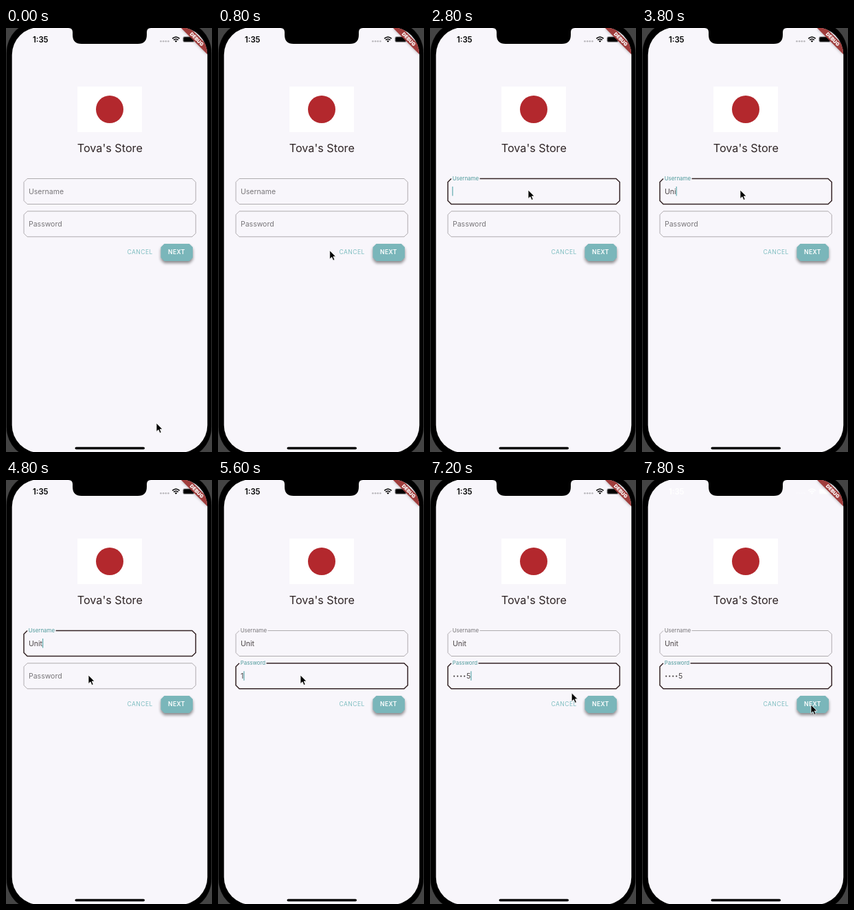
Recreate the animation shown at these times as an HTML page. Size 300 px wide and 615 px high, loop 8000 ms.

```html
<!DOCTYPE html>
<html lang="en">
<meta charset="utf-8">
<title>Login form</title>
<style>
  html, body { margin: 0; width: 100%; height: 100%; overflow: hidden; background: #000 }
  svg { display: block; width: 300px; height: 615px }
  text { font-family: Inter, Roboto, sans-serif; font-size: 10.5px; white-space: pre }
  .value { fill: #4a4445 }
</style>
<svg viewBox="0 0 300 615">
  <defs>
    <clipPath id="screen"><rect x="8.7" y="-1" width="284.6" height="617" rx="40"/></clipPath>
    <filter id="soft" x="-30%" y="-50%" width="160%" height="200%"><feGaussianBlur stdDeviation="2"/></filter>
  </defs>
  <rect width="300" height="615" fill="#444"/>
  <rect x=".3" y="-10" width="299.4" height="635" rx="46" stroke="#555" stroke-width=".6"/>
  <g clip-path="url(#screen)">
    <rect width="300" height="615" fill="#f8f6fb"/>
    <path d="M91 0Q97 0 97 6V10Q97 23 110 23H192Q205 23 205 10V6Q205 0 211 0Z"/>
    <g id="status">
      <text x="39" y="21" style="font-size:11.3px;font-weight:600">1:35</text>
      <g opacity=".25">
        <circle cx="225.5" cy="19.3" r="1.3"/><circle cx="229.2" cy="19.3" r="1.3"/>
        <circle cx="232.8" cy="19.3" r="1.3"/><circle cx="236.4" cy="19.3" r="1.3"/>
      </g>
      <g fill="none" stroke="currentColor" stroke-width="1.6">
        <path d="M242.3 15.3Q247.5 10.7 252.7 15.3M244.2 17.4Q247.5 14.6 250.8 17.4"/>
      </g>
      <path d="M245.7 18.8Q247.5 17.3 249.3 18.8L247.5 20.7Z"/>
      <rect x="257.5" y="12.2" width="17" height="8.6" rx="2.4" opacity=".4"/>
      <rect x="258.5" y="13.2" width="15" height="6.6" rx="1.6"/>
    </g>
    <path d="M255 0H268L293.5 25.5V38.5Z" opacity=".35" filter="url(#soft)"/>
    <path d="M255 0H268L293.5 25.5V38.5Z" fill="#a03d3c"/>
    <text transform="translate(277.8 16.2) rotate(45)" y="2.5" text-anchor="middle" fill="#fff"
      style="font-size:7.1px;font-weight:900">DEBUG</text>

    <rect x="104" y="85" width="94" height="66" fill="#fff"/>
    <circle cx="151" cy="118" r="20" fill="#b3282d"/>
    <text x="151.3" y="180.3" text-anchor="middle" fill="#2f2526" style="font-size:16.2px">Tova's Store</text>

    <g id="fields"></g>
    <g id="dots" class="value"></g>
    <rect id="caret" width="1.2" height="13.5" fill="#5fa9ad"/>

    <text x="176.5" y="328.3" fill="#80bfc2" style="font-size:8.6px;letter-spacing:.4px">CANCEL</text>
    <path d="M230.5 316H267L272 321V336L267 341H230.5L225.5 336V321Z" opacity=".45" filter="url(#soft)"/>
    <path d="M230.5 313H267L272 318V333L267 338H230.5L225.5 333V318Z" fill="#7ab6ba"/>
    <text x="236" y="328.3" fill="#fff" style="font-size:8.6px;letter-spacing:.4px;font-weight:600">NEXT</text>
    <rect x="100.5" y="607.8" width="101.5" height="3.4" rx="1.7"/>
  </g>
  <path id="mouse" d="M0 0V12.5L3 9.8 5 14.5 7.2 13.6 5.2 9H9Z" stroke="#fff" stroke-width=".8"/>
</svg>
<script>
const $ = id => document.getElementById(id);
const LOOP = 8000, STEP = 200;
const USER = 'Unit', USER_KEYS = [3200, 3600, 3800, 4400];
const PIN = '12345', PIN_KEYS = [5600, 5800, 6000, 6200, 6400];

// [start, end, from x, from y, to x, to y]
const MOVES = [
  [0, 1200, 219, 573, 143, 235],
  [4300, 4800, 143, 235, 120, 283],
  [6400, 6650, 120, 283, 142, 281],
  [6650, 7600, 142, 281, 246, 326]
];
// [time, caret opacity]
const BLINKS = [[0, 0], [1600, 1], [2200, .5], [2400, 0], [2800, 1],
  [6600, .5], [6800, 0], [7200, 1], [7600, .4], [7800, 0]];

function makeField(name, y, gapEnd) {
  const g = document.createElementNS('http://www.w3.org/2000/svg', 'g');
  g.innerHTML = `<path fill="none"/><text>${name}</text><text class="value" x="33" y="${y + 22.4}"></text>`;
  $('fields').append(g);
  const [border, label, value] = g.children;
  return {
    y, value,
    draw(floated, focused) {
      const start = floated ? gapEnd : 31, b = y + 37;
      border.setAttribute('d', `M${start} ${y}H271L276.3 ${y + 5}V${b - 5}L271 ${b}H31L26 ${b - 5}V${y + 5}L31 ${y}` +
        (floated ? '' : 'Z'));
      border.setAttribute('stroke', focused ? '#352426' : '#a7a4a8');
      border.setAttribute('stroke-width', focused ? 1.5 : .9);
      label.setAttribute('x', floated ? 32.7 : 33);
      label.setAttribute('y', y + (floated ? 2 : 22.4));
      label.style.fontSize = floated ? '7.9px' : '10.5px';
      label.setAttribute('fill', floated && focused ? '#4f9a9c' : '#777578');
    }
  };
}
const user = makeField('Username', 218.5, 72.5);
const pass = makeField('Password', 265.8, 70.5);

const typed = (keys, t) => keys.filter(k => k <= t).length;
const ease = p => p * p * (3 - 2 * p);

function mouseAt(t) {
  const [a, b, x, y, X, Y] = MOVES.filter(m => m[0] <= t).pop();
  const p = ease(Math.min(1, (t - a) / (b - a)));
  return [x + (X - x) * p, y + (Y - y) * p];
}

function draw(t) {
  const inPass = t >= 5200;
  user.draw(t >= 1800, t >= 1800 && !inPass);
  pass.draw(t >= 5400, t >= 5400);

  user.value.textContent = USER.slice(0, typed(USER_KEYS, t));
  const n = typed(PIN_KEYS, t), hidden = Math.max(0, n - 1);
  pass.value.textContent = n ? PIN[n - 1] : '';
  pass.value.setAttribute('x', 33 + 5 * hidden);
  $('dots').innerHTML = [...Array(hidden).keys()]
    .map(i => `<circle cx="${35.2 + 5 * i}" cy="284.6" r="1.15"/>`).join('');

  const active = inPass ? pass : user;
  const textEnd = +active.value.getAttribute('x') +
    (active.value.textContent ? active.value.getComputedTextLength() : -.7);
  $('caret').setAttribute('x', textEnd);
  $('caret').setAttribute('y', active.y + 11.5);
  $('caret').setAttribute('opacity', BLINKS.filter(b => b[0] <= t).pop()[1]);

  $('status').style.color = $('status').style.fill = t >= 7800 ? '#fff' : '#000';
  $('mouse').setAttribute('transform', `translate(${mouseAt(t)})`);
}

function tick() {
  const t = performance.now() % LOOP;
  draw(Math.floor(t / STEP) * STEP);
  requestAnimationFrame(tick);
}
tick();
</script>
</html>
```
